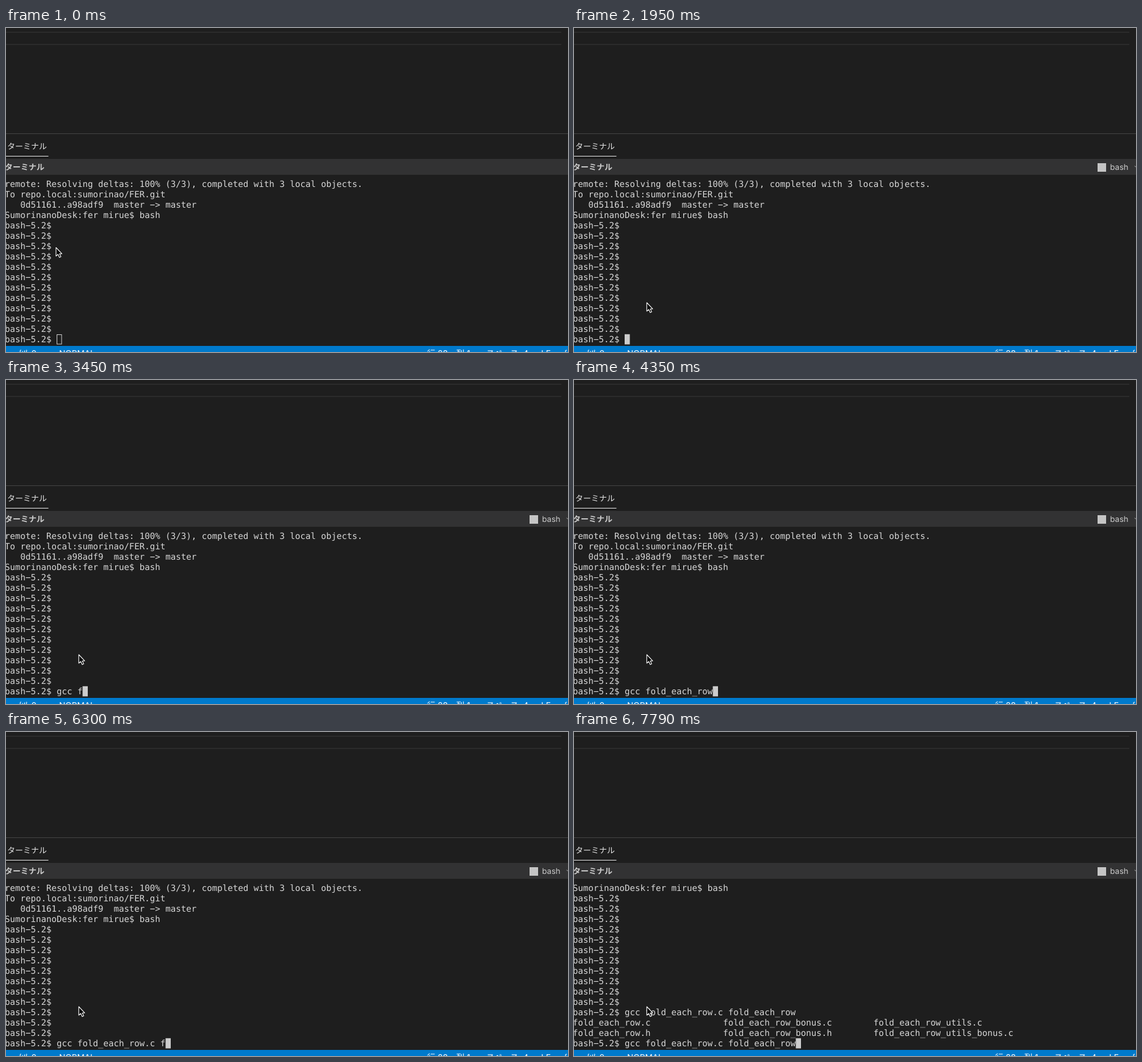
These frames come from a looping animation (921 by 532 pixels, 8 s). An HTML page:

```html
<!DOCTYPE html>
<html lang="ja">
<head>
<meta charset="utf-8">
<title>Terminal</title>
<style>
  html, body { margin: 0; width: 100%; height: 100%; overflow: hidden; background: #1e1e1e; }
  svg { display: block; width: 100%; height: 100%; }
  text { white-space: pre; text-rendering: geometricPrecision; }
  .term { font: 14.118px "DejaVu Sans Mono", monospace; fill: #d8d8d8; }
  .ui { font: 13px Inter, "Noto Sans CJK JP", "Noto Sans CJK", sans-serif; fill: #e7e7e7; }
  .status { font: 13.6px Inter, "Noto Sans CJK JP", "Noto Sans CJK", sans-serif; fill: #fff; }
</style>
</head>
<body>
<svg viewBox="0 0 921 532" preserveAspectRatio="none">
  <rect width="921" height="532" fill="#1e1e1e"/>
  <path d="M0 7H910M0 27H910" stroke="#303030" stroke-width="1.6"/>
  <path d="M0 173.5H921" stroke="#444"/>
  <text class="ui" x="2" y="199">ターミナル</text>
  <path d="M0 210.5H69.5" stroke="#e7e7e7"/>
  <rect y="215" width="921" height="26" fill="#323233"/>
  <text class="ui" x="-2" y="233" style="font-weight:700;fill:#ccc">ターミナル</text>
  <g id="shell">
    <rect x="858" y="222" width="14" height="14" fill="#c5c5c5"/>
    <text class="ui" x="878.5" y="233" style="fill:#ccc">bash</text>
    <path d="M919 226.5L921 228.5" stroke="#ccc"/>
  </g>

  <g id="lines" class="term"></g>
  <rect id="caret" y="503" width="8.5" height="16"/>

  <rect y="522" width="921" height="10" fill="#007acc"/>
  <g id="status" class="status">
    <path d="M23.5 532Q22.5 530 24.5 528.5M33 532Q34.5 530 33.5 528.5M27 532V530.5M30 532L31 529.5" fill="none" stroke="#fff" stroke-width="1.1"/>
  </g>

  <path id="arrow" d="M0 0V14L3.2 11.2L5.6 16.2L8 15.1L5.7 10.2H9.6Z" fill="#000" stroke="#fff" stroke-width="1.1" stroke-linejoin="round"/>
  <g id="beam" fill="none" stroke-linecap="round">
    <path d="M-3-8Q0-8 0-5.5Q0-8 3-8M0-6V6M-3 8Q0 8 0 5.5Q0 8 3 8M-2 2H2" stroke="#fff" stroke-width="2.6"/>
    <path d="M-3-8Q0-8 0-5.5Q0-8 3-8M0-6V6M-3 8Q0 8 0 5.5Q0 8 3 8M-2 2H2" stroke="#111" stroke-width="1"/>
  </g>
</svg>
<script>
const LOOP = 8000, CELL = 8.5, LEFT = -2, ROW = 17, BASE = 261, ROWS = 16;
const FOCUS = 600, LIST = 7790;
const $ = id => document.getElementById(id);

function addText(parent, x, y, str = '') {
  const el = document.createElementNS('http://www.w3.org/2000/svg', 'text');
  el.setAttribute('x', x);
  el.setAttribute('y', y);
  el.textContent = str;
  parent.append(el);
  return el;
}

[[41.5, '0'], [87, 'NORMAL'], [690, '行 28、列 1'], [787, 'スペース: 4'], [877, 'LF'], [914, '{']]
  .forEach(([x, str]) => addText($('status'), x, 538.7, str));

const prompt = 'bash-5.2$ ';
const name = 'fold_each_row';
const command = `gcc ${name}.c ${name}`;
const columns = (...cells) => cells.map(c => c.padEnd(29)).join('');

const history = [
  'remote: Resolving deltas: 100% (3/3), completed with 3 local objects.',
  'To repo.local:sumorinao/FER.git',
  '   0d51161..a98adf9  master -> master',
  'SumorinanoDesk:fer mirue$ bash',
  ...Array(11).fill(prompt)
];
const listing = [
  prompt + command,
  columns(`${name}.c`, `${name}_bonus.c`, `${name}_utils.c`),
  columns(`${name}.h`, `${name}_bonus.h`, `${name}_utils_bonus.c`)
];

// [time, characters typed]
const typing = [[0, 0], [2400, 1], [2550, 2], [2700, 3], [2850, 4], [3450, 5], [4050, 6],
  [4350, 17], [5550, 19], [5850, 20], [6300, 21], [7050, 33]];

// [time, shape, x, y]
const pointer = [[0, 'arrow', 82, 360.5], [150, 'arrow', 105.5, 405], [300, 'arrow', 106, 406],
  [450, 'beam', 107, 408], [750, 'beam', 119.5, 451.5], [900, 'beam', 119.5, 452],
  [1950, 'arrow', 119.3, 451]];

const at = (keys, t) => keys.findLast(k => k[0] <= t);
const show = (el, on) => el.setAttribute('visibility', on ? 'visible' : 'hidden');
const rows = Array.from({ length: ROWS }, (_, i) => addText($('lines'), LEFT, BASE + i * ROW));

function draw(t) {
  const typed = at(typing, t)[1];
  const buffer = [...history, ...(t >= LIST ? listing : []), prompt + command.slice(0, typed)].slice(-ROWS);
  rows.forEach((row, i) => {
    const str = buffer[i].replace(/-/g, '\u2212'); // wide dash
    if (row.textContent !== str) row.textContent = str;
  });

  const focused = t >= FOCUS;
  const caret = $('caret');
  const x = LEFT + (prompt.length + typed) * CELL;
  caret.setAttribute('x', focused ? x : x + 0.5);
  caret.setAttribute('y', focused ? 502.8 : 503.5);
  caret.setAttribute('width', focused ? CELL : 7.6);
  caret.setAttribute('height', focused ? 16.7 : 15.5);
  caret.setAttribute('fill', focused ? '#ccc' : 'none');
  caret.setAttribute('stroke', focused ? 'none' : '#ccc');
  show($('shell'), focused);

  const [, shape, px, py] = at(pointer, t);
  for (const id of ['arrow', 'beam']) {
    show($(id), id === shape);
    $(id).setAttribute('transform', `translate(${px} ${py})`);
  }
}

const start = performance.now();
function tick() {
  draw((performance.now() - start) % LOOP);
  requestAnimationFrame(tick);
}
tick();
</script>
</body>
</html>
```
